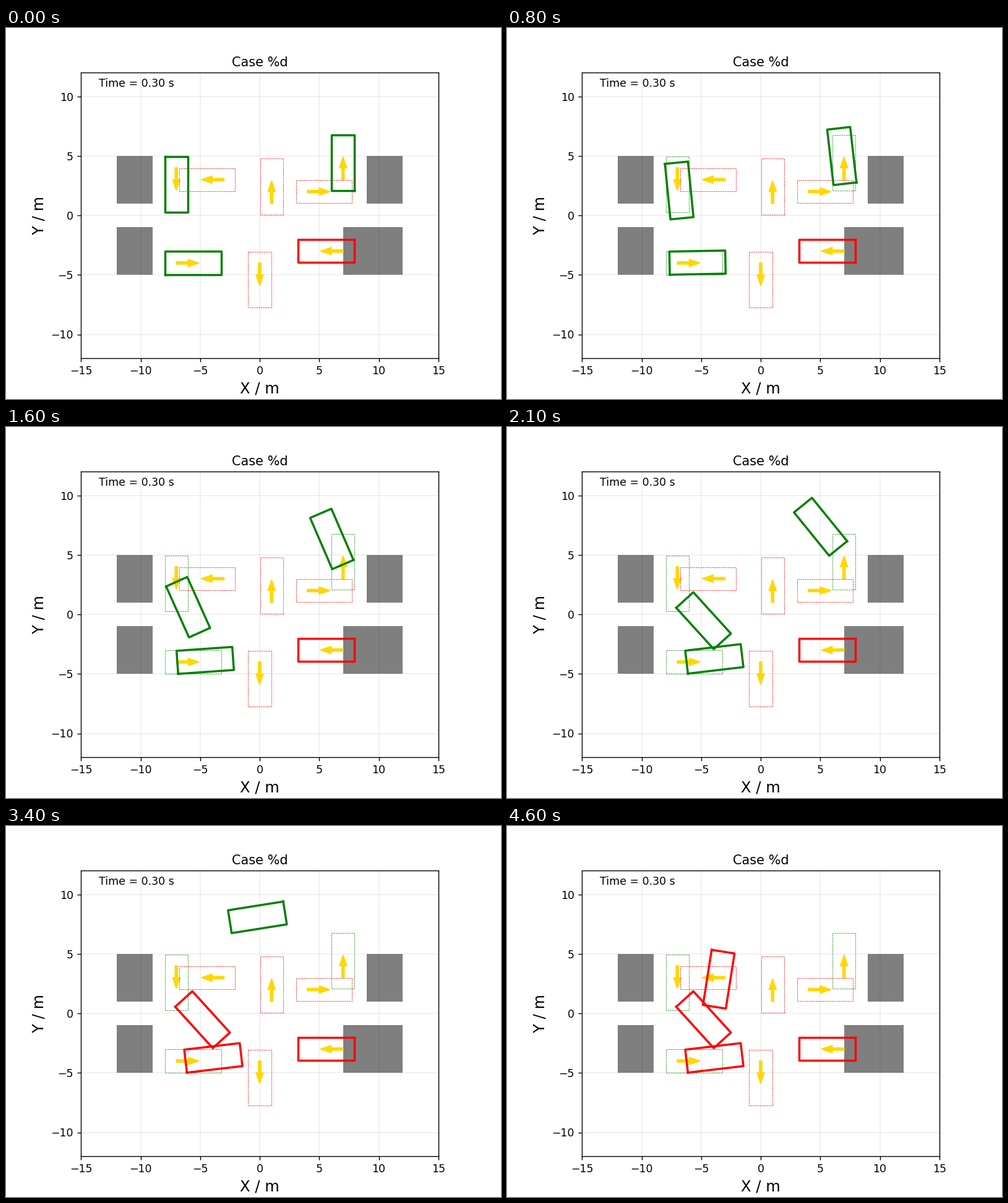
Recreate the animation shown at these times as a matplotlib script. Size 800 by 600 pixels, loop 4.9 s.

```python
import numpy as np
import matplotlib.pyplot as plt
from matplotlib.animation import FuncAnimation

WHEELBASE, FRONT, REAR, WIDTH = 2.8, 0.96, 0.929, 1.942
FRAMES, INTERVAL = 49, 100

# start pose, first step length, growth per step, steering angle, steps until the crash
CARS = [
    ((7, 3, np.pi / 2), 0.0217, 0.01447, 0.5, 45),
    ((-7, 4, -np.pi / 2), 0.0, 0.018, 0.5, 21),
    ((-7, -4, 0), 0.0102, 0.0071, 0.19, 21),
    ((7, -3, np.pi), 0.0, 0.0, 0.0, -1),
]
GOALS = [(-3, 3, np.pi), (1, 1, np.pi / 2), (4, 2, 0), (0, -4, -np.pi / 2)]
# left, right, bottom, top
OBSTACLES = [(-12, -9, 1, 5), (-12, -9, -5, -1), (9, 12, 1, 5), (7, 12, -5, -1)]


def outline(x, y, heading):
    """Closed car contour around the rear axle, from the rear right corner."""
    f, h = WHEELBASE + FRONT, WIDTH / 2
    u = np.array([-REAR, f, f, -REAR, -REAR])
    v = np.array([-h, -h, h, h, -h])
    c, s = np.cos(heading), np.sin(heading)
    return x + c * u - s * v, y + s * u + c * v


def drive(pose, step, growth, steer, count):
    """Bicycle model, one explicit step per frame."""
    x, y, heading = pose
    path = [pose]
    for _ in range(max(count, 0)):
        x += step * np.cos(heading)
        y += step * np.sin(heading)
        heading += step * np.tan(steer) / WHEELBASE
        step += growth
        path.append((x, y, heading))
    return path


def mark(ax, pose, color):
    x, y, heading = pose
    ax.plot(*outline(*pose), linestyle='--', linewidth=0.4, color=color)
    ax.arrow(x, y, np.cos(heading), np.sin(heading), width=0.2, color='gold')


plt.rcParams['font.family'] = 'DejaVu Sans'
fig, ax = plt.subplots(figsize=(6.4, 4.8), dpi=125)
ax.set_aspect('equal', adjustable='box')
ax.set_axisbelow(True)
ax.grid(linewidth=0.2)
ax.set_title('Case %d')
ax.set_xlabel('X / m', fontsize=14)
ax.set_ylabel('Y / m', fontsize=14)
ax.text(0.05, 0.95, 'Time = 0.30 s', transform=ax.transAxes)

for left, right, bottom, top in OBSTACLES:
    ax.fill([left, right, right, left], [bottom, bottom, top, top],
            facecolor='k', alpha=0.5)
for car in CARS:
    mark(ax, car[0], 'green')
for goal in GOALS:
    mark(ax, goal, 'red')

ax.set_xlim(-15, 15)
ax.set_ylim(-12, 12)
ax.set_xticks(range(-15, 16, 5))
ax.set_yticks(range(-10, 11, 5))

paths = [drive(*car) for car in CARS]
bodies = [ax.plot([], [], linewidth=2)[0] for _ in CARS]


def update(i):
    for body, path, car in zip(bodies, paths, CARS):
        body.set_data(*outline(*path[min(i, len(path) - 1)]))
        body.set_color('red' if i > car[-1] else 'green')
    return bodies


anim = FuncAnimation(fig, update, frames=FRAMES, interval=INTERVAL,
                     repeat=True, repeat_delay=0)
plt.show()
```
